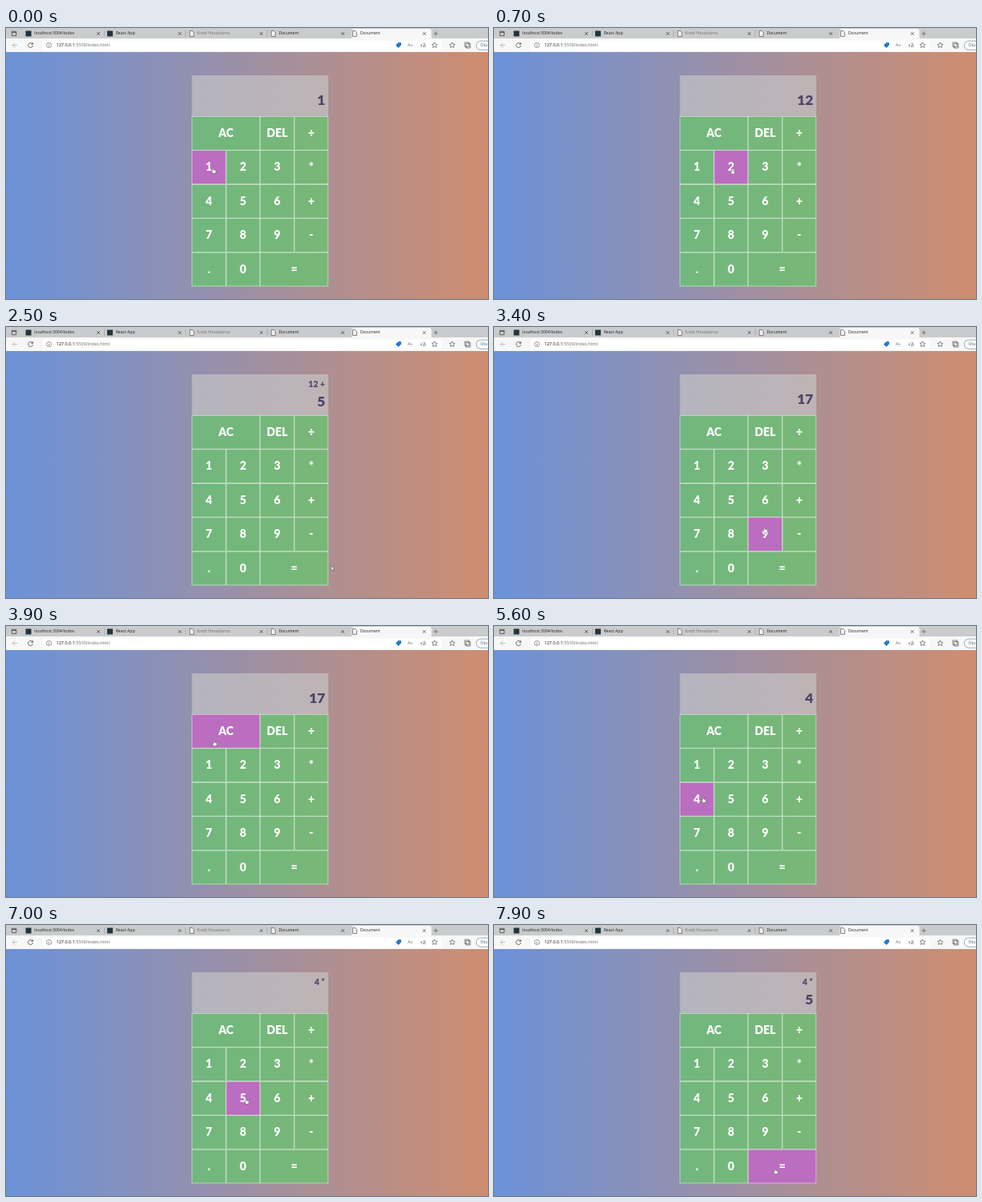
An HTML page with a canvas for the animation above (8 s loop, 600 px wide and 338 px high).

```html
<!DOCTYPE html>
<html lang="en">
<head>
<meta charset="utf-8">
<title>Calculator</title>
<style>
html, body { margin: 0; width: 100%; height: 100%; overflow: hidden; }
canvas { display: block; width: 600px; height: 338px; }
</style>
</head>
<body>
<canvas id="stage" width="600" height="338"></canvas>
<script>
const ctx = document.getElementById('stage').getContext('2d');
const LOOP = 8000, STEP = 100, DWELL = 150;
const LEFT = 231.4, TOP = 110, CELL = 42.45;
const UI = '"Open Sans", "Noto Sans", sans-serif';
const BOLD = 'Lato, sans-serif';

// An empty slot widens the key before it.
const rows = [['AC', '', 'DEL', '÷'], [...'123*'], [...'456+'], [...'789-'], ['.', '0', '=', '']];
const keys = rows.flatMap((row, r) => row.map((label, c) => ({
  label, x: LEFT + c * CELL, y: TOP + r * CELL, w: row[c + 1] === '' ? 2 * CELL : CELL
}))).filter(key => key.label);

// The pointer rests around each press, at an offset from the key's centre.
const stops = [
  ['1', 0, 6, 4], ['2', 600, 2, 5], ['+', 1750, 0, 11], ['5', 2150, 2, 5],
  ['=', 2600, 48, 0], ['=', 2950, 15, 2], ['AC', 4050, -14, 15],
  ['4', 5400, 7, 1], ['*', 6450, -6, 7], ['5', 7200, 2, 5], ['=', 8050, -8, 6]
].map(([label, time, dx, dy]) => {
  const key = keys.find(k => k.label === label);
  return { time, x: key.x + key.w / 2 + dx, y: key.y + CELL / 2 + dy };
});

function pointerAt(t) {
  const i = stops.findIndex(s => s.time + DWELL > t);
  const to = stops[i], from = stops[i - 1] || to;
  const start = from.time + DWELL, end = to.time - DWELL;
  const u = Math.min(1, Math.max(0, (t - start) / (end - start)));
  const k = u * u * (3 - 2 * u);
  return { x: from.x + (to.x - from.x) * k, y: from.y + (to.y - from.y) * k };
}

// The pointer's tip lies up and left of its middle.
function keyAt({ x, y }) {
  return keys.find(k => x - 1 >= k.x && x - 1 < k.x + k.w && y - 3 >= k.y && y - 3 < k.y + CELL);
}

function displayAt(t) {
  let pending = '', number = '';
  for (const stop of stops.filter(s => s.time <= t)) {
    const label = keyAt(stop)?.label;
    if (!label) continue;
    if (label === 'AC') pending = number = '';
    else if (label >= '0' && label <= '9') number += label;
    else if (label === '=') {
      const [a, op] = pending.split(' ');
      number = String(op === '+' ? +a + +number : a * number);
      pending = '';
    } else {
      pending = number + ' ' + label;
      number = '';
    }
  }
  return [pending, number];
}

function rect(x, y, w, h, fill, radius = 0) {
  ctx.fillStyle = fill;
  ctx.beginPath();
  ctx.roundRect(x, y, w, h, radius);
  ctx.fill();
}

function text(str, x, y, font, fill, align = 'left') {
  ctx.font = font;
  ctx.fillStyle = fill;
  ctx.textAlign = align;
  ctx.fillText(str, x, y);
}

function icon(d, x, y, color = '#555', fill = 'transparent', width = 0.7) {
  const shape = new Path2D(d);
  ctx.save();
  ctx.translate(x, y);
  ctx.fillStyle = fill;
  ctx.fill(shape);
  ctx.strokeStyle = color;
  ctx.lineWidth = width;
  ctx.lineJoin = 'round';
  ctx.stroke(shape);
  ctx.restore();
}

const CROSS = 'M-1.8-1.8L1.8 1.8M1.8-1.8L-1.8 1.8';
const PLUS = 'M-2.6 0H2.6M0-2.6V2.6';
const BOX = 'M-2.7-2.7H2.7V2.7H-2.7Z';
const PAGE = 'M-2.5-3.5H.7L2.5-1.5V3.5H-2.5Z';
const HAND = 'M-1.6-3.4Q-.7-4.2-.3-3.2V-.9L2.3-.2Q3 .1 2.8 1L2.2 3.6H-1.1L-3 .9Q-2.9-.2-1.6.7Z';
const ARROW = 'M-1.8-3V2.4L-.6 1.4L.3 3.3L1.3 2.8L.4 1H2Z';
const STAR = 'M' + Array.from({ length: 10 }, (_, i) => {
  const angle = i * Math.PI / 5, r = i % 2 ? 1.7 : 3.6;
  return [r * Math.sin(angle), -r * Math.cos(angle)];
}).join('L') + 'Z';

function drawTabs() {
  rect(0, 0, 600, 14, '#cacbcc');
  rect(0, 13, 600, 17, '#f7f7f7');
  icon(BOX + 'M-2.7-1.5H2.7', 10, 7, '#333');
  const titles = ['localhost:3004/todos', 'React App', 'Kredi Hesaplama', 'Document', 'Document'];
  titles.forEach((title, i) => {
    const x = 22 + i * 101.4, active = i === 4;
    if (active) rect(x + 3, 1, 99, 14, '#f7f7f7', 3);
    else if (i < 3) rect(x + 100, 3, 0.6, 8, '#999');
    if (i < 2) rect(x + 2.5, 3.5, 7, 7, '#22343c');
    else icon(PAGE, x + 6.5, 7, '#555', '#f2f2f2');
    text(title, x + 13.3, 7, '5.1px ' + UI, i === 2 ? '#777' : '#222');
    icon(CROSS, x + 93, 7, '#333');
  });
  icon(PLUS, 535, 7);
}

function drawToolbar() {
  const y = 21.5, small = '5.1px ' + UI, medium = '5.5px ' + UI;
  icon('M3 0H-3M0-3L-3 0L0 3', 11, y, '#aaa');
  icon('M2.7-1.4A3 3 0 1 0 3 .6M2.9-3.3V-1.2H.8', 30.5, y, '#333');
  rect(45, 15.5, 497, 12.5, '#fff', 3);
  icon('M3 0A3 3 0 1 1-3 0A3 3 0 1 1 3 0M0-.5V1.8M0-1.7V-1.1', 53.5, y, '#666');
  text('127.0.0.1', 62.5, y, medium, '#111');
  text(':5500/index.html', 62.5 + ctx.measureText('127.0.0.1').width, y, medium, '#666');

  icon('M-3 0L0-3H3V0L0 3Z', 488.5, y, '#1769bd', '#1f79d2');
  text('A»', 500, y, medium, '#666');
  text('aあ', 515.5, y, '5px "Noto Sans CJK JP", sans-serif', '#666');
  for (const x of [533.5, 555.5]) icon(STAR, x, y);
  for (const d of [-0.8, 0.8]) icon(BOX, 574.5 + d, y + d);
  rect(585, 15.8, 30, 11.6, '#7890a8', 6);
  rect(585.7, 16.5, 28.6, 10.2, '#fff', 5);
  text('Oturum aç', 590.5, y, small, '#456');
}

function drawPage() {
  const sky = ctx.createLinearGradient(0, 0, 600, 0);
  sky.addColorStop(0, '#6b92d9');
  sky.addColorStop(1, '#cf8d6f');
  rect(0, 30, 600, 308, sky);
}

function drawCalculator(t, hovered) {
  rect(LEFT, 59, CELL * 4, 51, 'rgba(200,200,200,.65)');
  const [pending, number] = displayAt(t);
  text(pending, 397, 72, '900 10.5px ' + BOLD, '#514868', 'right');
  text(number, 397.5, pending ? 94 : 90.5, '900 17.5px ' + BOLD, '#4b4266', 'right');

  ctx.strokeStyle = 'rgba(255,255,255,.75)';
  ctx.lineWidth = 0.6;
  for (const key of keys) {
    const { label, x, y, w } = key;
    rect(x, y, w, CELL, key === hovered ? '#bb6dbf' : 'rgba(103,196,110,.75)');
    ctx.strokeRect(x + 0.3, y + 0.3, w - 0.6, CELL - 0.6);
    text(label, x + w / 2, y + CELL / 2 + 0.5, '900 14px ' + BOLD, '#fff', 'center');
  }
}

function draw(now) {
  const t = Math.floor(now % LOOP / STEP) * STEP;
  const pointer = pointerAt(t), hovered = keyAt(pointer);
  ctx.textBaseline = 'middle';
  drawPage();
  drawTabs();
  drawToolbar();
  drawCalculator(t, hovered);
  icon(hovered ? HAND : ARROW, pointer.x, pointer.y, '#444', '#fff', 0.5);
  requestAnimationFrame(draw);
}
requestAnimationFrame(draw);
</script>
</body>
</html>
```
